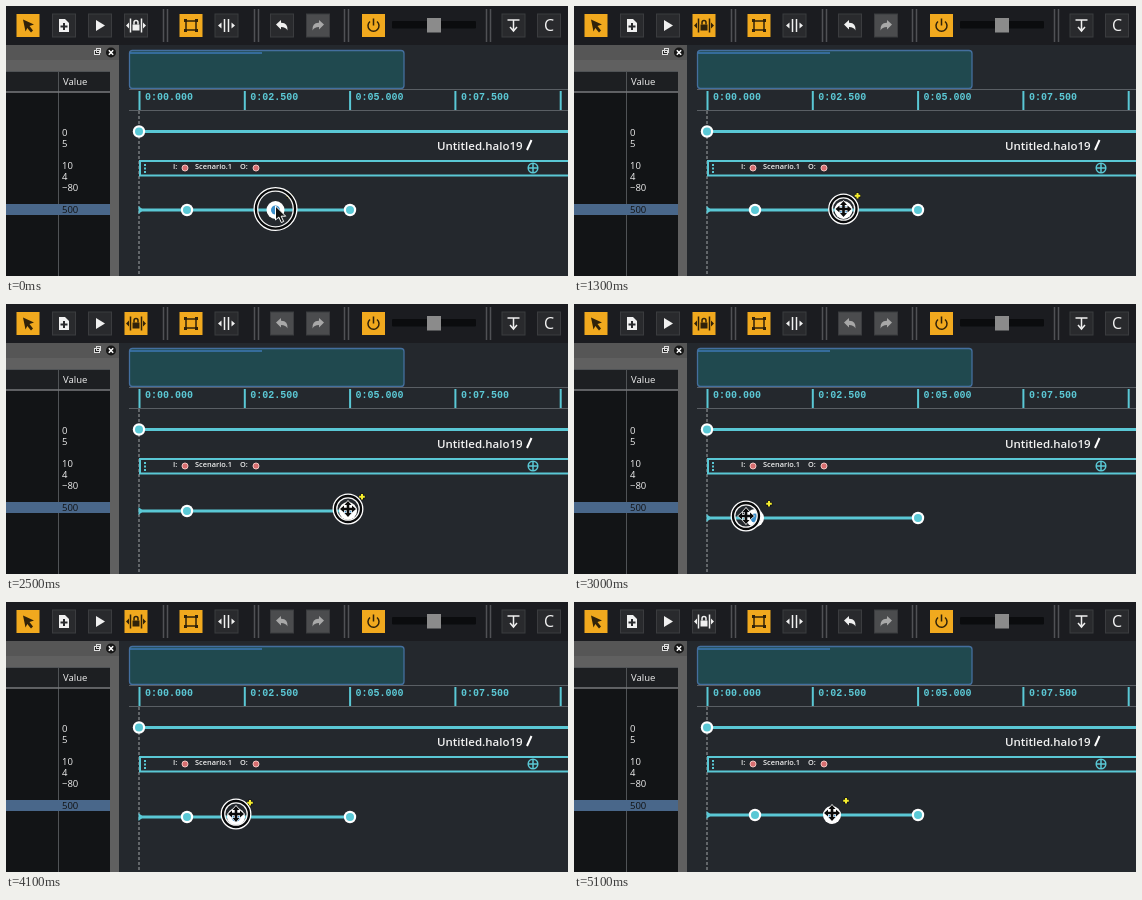
Animation of 562 by 270 pixels, one loop 5200 ms. Source, as an HTML page:

```html
<!DOCTYPE html>
<html>
<head>
<meta charset="utf-8">
<style>
  html, body { margin: 0; width: 100%; height: 100%; overflow: hidden; background: #24282d; }
  svg { display: block; width: 562px; height: 270px; font-family: "Open Sans", sans-serif; fill: #f2f2f2; }
  .mono { font: bold 10px "Liberation Mono", monospace; fill: #5cc9d6; }
  .line { fill: none; stroke: #5ac8d5; }
  .button { color: #f0f0f0; --face: #292a2d; }
  .button.lit { color: #30220a; --face: #f1a91e; }
  .button.dim { color: #a8a8a8; --face: #4b4c4e; }
  .button rect { fill: var(--face); stroke: #3b3c3f; }
  .button.lit rect { stroke: none; }
  .button path { fill: none; stroke: currentColor; stroke-width: 1.5; }
  .button .solid { fill: currentColor; stroke: none; }
</style>
</head>
<body>
<svg viewBox="0 0 562 270">
  <defs>
    <g id="knob"><circle r="6.2" fill="#fff"/><circle r="4" fill="#5ac8d5"/></g>
    <circle id="port" r="3" fill="#d76e70" stroke="#f3c3c0"/>
  </defs>
  <rect width="562" height="270" fill="#24282d"/>

  <!-- Toolbar -->
  <rect width="562" height="39" fill="#1b1c20"/>
  <g id="toolbar"></g>
  <rect x="386" y="15" width="84" height="7.500" rx="1" fill="#0b0c0e"/>
  <rect x="421" y="12" width="14" height="14.500" fill="#8b8b8b"/>

  <!-- Inspector table -->
  <rect y="39" width="113" height="231" fill="#606060"/>
  <rect y="39" width="113" height="15" fill="#565656"/>
  <rect x="88.500" y="44.500" width="5" height="4" fill="#222" stroke="#ddd"/>
  <rect x="90.500" y="42.500" width="4" height="4" fill="none" stroke="#ddd"/>
  <circle cx="105" cy="46.500" r="5" fill="#161616"/>
  <path d="M102.800 44.300l4.400 4.400M107.200 44.300l-4.400 4.400" stroke="#fff" stroke-width="1.500"/>
  <rect y="65" width="104" height="205" fill="#121416"/>
  <rect y="66" width="104" height="20" fill="#1d1f22"/>
  <path d="M0 65.500h104M52.500 66v204" stroke="#505356"/>
  <path d="M0 86h104" stroke="#77797b" stroke-width="1.500"/>
  <rect y="198" width="104" height="11" fill="#49678a"/>
  <g id="values" font-size="9.500"><text x="57" y="79">Value</text></g>

  <!-- Timeline -->
  <rect x="123.500" y="44.500" width="274.500" height="38" rx="3" fill="#20494f" stroke="#446f9e" stroke-width="1.300"/>
  <path d="M124 47h132" stroke="#3d78b4" stroke-width="1.300"/>
  <path d="M123 83.500h439M123 104.500h439" stroke="#5a5f64"/>
  <g id="ruler"></g>
  <path d="M133 105v165" stroke="#a0a4a7" stroke-dasharray="3 2"/>
  <path class="line" d="M133 125.500h429" stroke-width="3"/>
  <use href="#knob" x="133" y="125.500"/>
  <text x="431" y="143.500" font-size="11.500" font-weight="600">Untitled.halo19</text>
  <path d="M521 144l4.500-10" stroke="#fff" stroke-width="2"/>
  <path class="line" d="M562 155H134v14.500h428" stroke-width="2"/>
  <path class="line" d="M139 158v9" stroke-width="2" stroke-dasharray="2 1.500"/>
  <g font-size="7.400" font-weight="600">
    <text x="167" y="162.500">I:</text><text x="189" y="162.500">Scenario.1</text><text x="234" y="162.500">O:</text>
  </g>
  <use href="#port" x="179" y="162"/>
  <use href="#port" x="250" y="162"/>
  <circle class="line" cx="527" cy="162" r="4.800" stroke-width="1.500"/>
  <path class="line" d="M522 162h10M527 157v10" stroke-width="1.500"/>

  <!-- Draggable curve -->
  <g id="curve">
    <path class="line" d="M134 0h210" stroke-width="3"/>
    <path d="M132.500-4l5 4-5 4z" fill="#5ac8d5"/>
    <use href="#knob" x="181"/>
    <use href="#knob" x="344"/>
    <g id="point">
      <circle r="9" fill="#fff"/><circle r="4.500" fill="#3b8fcb"/>
      <path d="M14-17.500v6.500M10.800-14.200h6.500" stroke="#111" stroke-width="3.200"/>
      <path d="M14-17v5.600M11.200-14.200h5.600" stroke="#f5ee2e" stroke-width="2"/>
    </g>
  </g>
  <g id="cursor">
    <g id="ring" fill="none">
      <circle id="band" stroke="#08090a" stroke-width="4"/>
      <circle id="outer" stroke="#fff" stroke-width="1.300"/>
      <circle id="inner" stroke="#f4f4f4" stroke-width="1.300"/>
    </g>
    <path id="arrow" d="M0-3v14l3.300-3 2.500 5.500 2.400-1-2.500-5.300h4.500z" fill="#111" stroke="#fff"/>
    <path id="move" d="M0-8l3.500 4H1.300v2.700H4V-3.500L8 0 4 3.500V1.300H1.300V4h2.200L0 8-3.500 4h2.200V1.300H-4v2.200L-8 0l4-3.500v2.200h2.700V-4h-2.200z"
      fill="#0a0a0a" stroke="#fff" stroke-width="1.200" paint-order="stroke"/>
  </g>
</svg>
<script>
const LOOP = 5200, STEP = 100;
const $ = id => document.getElementById(id);
const place = (id, x, y) => $(id).setAttribute('transform', `translate(${x} ${y})`);
const show = (id, on) => $(id).style.display = on ? '' : 'none';

const solid = d => `<path class="solid" d="${d}"/>`;
const stroke = d => `<path d="${d}"/>`;
const backArrow = 'M-6-1L-1-5.500V-2.700Q6-3 5.500 5Q4 1.500-1 1.500V4Z';
const frontArrow = 'M6-1L1-5.500V-2.700Q-6-3-5.500 5Q-4 1.500 1 1.500V4Z';

// id, centre x, state, icon
const buttons = [
  ['select', 22, 'lit', solid('M-5-6L6-1 1.500.5 5 5 3 7-.7 2.500-2.500 6Z')],
  ['add', 58, '', solid('M-5-6.500h6l4 4v9h-10zM-1-2.500v2.500h-2.500v2h2.500v2.500h2v-2.500h2.500v-2h-2.500v-2.500z')],
  ['play', 94, '', solid('M-4-5.500l9 5.500-9 5.500z')],
  ['lock', 130, '', stroke('M-5.500-7v14M5.500-7v14M-2-1v-2a2 2 0 0 1 4 0v2')
    + solid('M-3.500-1h7v6h-7zM-7-3v6l-3-3zM7-3v6l3-3z')],
  ['frame', 185, 'lit', stroke('M-5-4.500h10v9h-10z')
    + solid('M-7-6.500h3v3h-3zM4-6.500h3v3h-3zM-7 3.500h3v3h-3zM4 3.500h3v3h-3z')],
  ['spread', 220.5, '', stroke('M-2-6.500v13M2-6.500v13') + solid('M-5-3v6l-3.500-3zM5-3v6l3.500-3z')],
  ['undo', 276, '', solid(backArrow)],
  ['redo', 312, 'dim', solid(frontArrow)],
  ['power', 367.5, 'lit', stroke('M-3.500-4a5.500 5.500 0 1 0 7 0M0-7v7')],
  ['drop', 507.5, '', stroke('M-6-5.500h12M0-5v9M-3.500 1.500l3.500 4 3.500-4')],
  ['letter', 543, '', '<text x="-5" y="5.800" font-size="16">C</text>']
];
$('toolbar').innerHTML = buttons.map(([id, x, state, icon]) =>
  `<g id="${id}" class="button ${state}" transform="translate(${x} 19.500)">
    <rect x="-11.500" y="-11.500" width="23" height="23"/>${icon}</g>`
).join('') + [157, 248, 338, 480].map(x =>
  `<path d="M${x}.500 3v33M${x + 4}.500 3v33" stroke="#505155" stroke-width="1.500"/>`).join('');

$('values').innerHTML += [[0, 130], [5, 141], [10, 163], [4, 174], ['−80', 185], [500, 207]]
  .map(([value, y]) => `<text x="56" y="${y}"${value === 500 ? ' fill="#111"' : ''}>${value}</text>`).join('');

$('ruler').innerHTML = [0, 1, 2, 3, 4].map(i => {
  const x = 133.5 + i * 105.3;
  const label = i < 4 ? `0:0${(i * 2.5).toFixed(3)}` : '';
  return `<path class="line" d="M${x} 85v19" stroke-width="2"/><text class="mono" x="${x + 5.5}" y="94">${label}</text>`;
}).join('');

// time, cursor x, cursor y, curve y
const keys = [
  [0, 269.5, 203, 204], [1400, 269.5, 203, 204], [2000, 347, 201, 204], [2500, 342, 205, 207],
  [3000, 172, 212, 214], [4100, 230, 212, 215], [5100, 258, 211, 213], [LOOP, 258, 211, 213]
];

function pose(t) {
  const i = keys.findIndex(key => key[0] > t);
  const from = keys[i - 1], to = keys[i];
  const u = (t - from[0]) / (to[0] - from[0]);
  const ease = u * u * (3 - 2 * u);
  return from.map((v, k) => v + (to[k] - v) * ease).slice(1);
}

function draw(now) {
  const t = Math.floor(now % LOOP / STEP) * STEP;
  const [x, y, curveY] = pose(t);
  place('curve', 0, curveY);
  place('point', Math.max(181, Math.min(344, x)), 0);
  place('cursor', x, y);

  const radius = 14.8 + 6.6 * Math.max(0, 1 - t / 200);
  $('outer').setAttribute('r', radius);
  $('band').setAttribute('r', radius - 1.8);
  $('inner').setAttribute('r', radius - 3.6);
  show('ring', t < 5000);
  show('arrow', t < 200);
  show('move', t >= 200);

  $('lock').classList.toggle('lit', t >= 500 && t < 4900);
  $('undo').classList.toggle('dim', t >= 1500 && t < 5000);
  requestAnimationFrame(() => draw(performance.now()));
}
draw(0);
</script>
</body>
</html>
```
